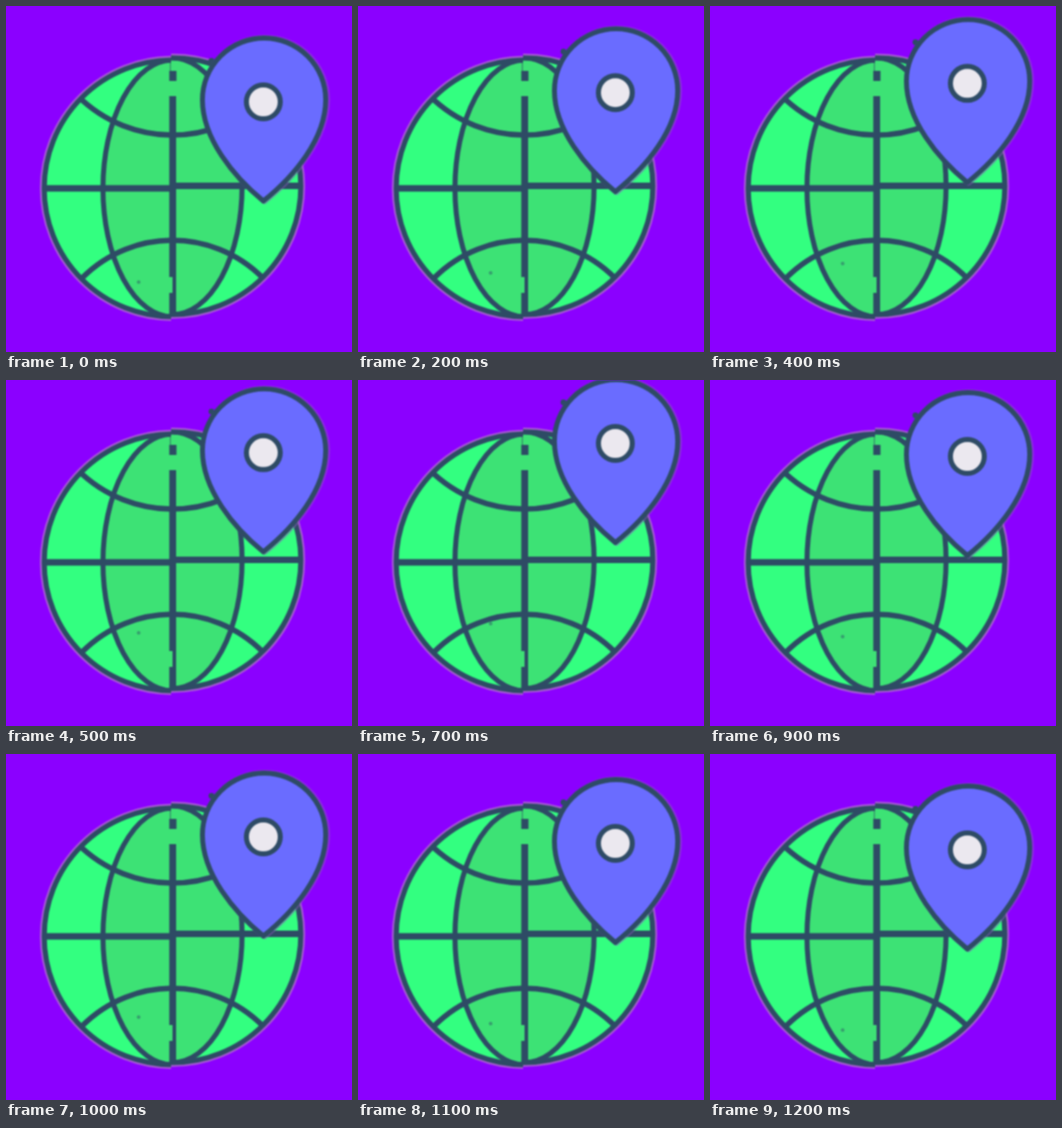
Write an HTML page with a canvas that moves like this. It is 480 px wide and 480 px high and loops after 1.3 s.

```html
<!DOCTYPE html>
<html lang="en">
<head>
<meta charset="utf-8">
<title>Globe with map pin</title>
<style>
html, body { margin: 0; width: 100%; height: 100%; overflow: hidden; background: #8b00ff; }
canvas { display: block; width: 100vw; height: 100vh; filter: blur(0.9px); }
</style>
</head>
<body>
<canvas id="stage" width="480" height="480"></canvas>
<script>
const ctx = document.getElementById('stage').getContext('2d');
const INK = '#2e4b65', BG = '#8b00ff', LIGHT = '#33ff80', MID = '#3de275';
const PIN = '#6a6cff', HOLE = '#ebe8ef';
const CX = 231, R = 178, LOOP = 1300, STEP = 100, RISE = 700, FALL = 500, TRAVEL = 45;

function shape(path, fill, stroke, width) {
  ctx.beginPath();
  path();
  if (fill) { ctx.fillStyle = fill; ctx.fill(); }
  if (stroke) { ctx.strokeStyle = stroke; ctx.lineWidth = width; ctx.stroke(); }
}

const disc = (x, y, r) => () => ctx.arc(x, y, r, 0, Math.PI * 2);

function bar(x, y, w, h, color = INK) {
  ctx.fillStyle = color;
  ctx.fillRect(x, y, w, h);
}

// The two halves of the globe sit at slightly different heights.
function half(x, width, cy, equator) {
  ctx.save();
  ctx.beginPath();
  ctx.rect(x, 0, width, 480);
  ctx.clip();
  shape(disc(CX, cy, R), null, 'rgba(176,122,196,0.75)', 12);
  shape(disc(CX, cy, R), LIGHT);
  ctx.save();
  ctx.beginPath();
  ctx.arc(CX, cy, R, 0, Math.PI * 2);
  ctx.clip();
  shape(() => ctx.ellipse(CX, cy, 96.5, R, 0, 0, Math.PI * 2), MID, INK, 7);
  shape(disc(CX, -7.5, 186.5), null, INK, 7.5);
  shape(disc(CX, 501.5, 176.5), null, INK, 7.5);
  bar(CX - R, equator - 4.5, R * 2, 9);
  ctx.restore();
  shape(disc(CX, cy, R), null, INK, 7);
  ctx.restore();
}

function globe() {
  half(0, 229, 253, 253);
  half(229, 251, 250, 249.5);
  bar(226.5, 90, 10, 14);
  bar(226.5, 125, 9.5, 251);
  bar(231, 375, 5, 55);
  bar(226.5, 398, 9.5, 32);
  bar(227, 76, 2, 14, 'rgba(46,75,101,0.45)');
}

function drop() {
  ctx.moveTo(357, 270.5);
  ctx.bezierCurveTo(316, 237, 272.5, 184, 272.5, 130);
  ctx.arc(358, 130, 85.5, Math.PI, 0);
  ctx.bezierCurveTo(443.5, 184, 400, 236, 357, 270.5);
  ctx.closePath();
}

function pin(dy) {
  ctx.save();
  ctx.translate(0, dy);
  shape(disc(184, 383, 2.5), 'rgba(46,75,101,0.45)');
  shape(disc(285, 76, 4), INK);
  ctx.save();
  ctx.translate(1.5, 0);
  shape(drop, null, 'rgba(140,90,190,0.5)', 9);
  ctx.restore();
  shape(drop, PIN, INK, 6.8);
  shape(disc(357, 133, 23.5), HOLE, INK, 7);
  ctx.restore();
}

function lift(t) {
  return t <= RISE ? t / RISE : Math.max(0, 1 - (t - RISE) / FALL);
}

function draw(now) {
  const t = Math.floor((now % LOOP) / STEP) * STEP;
  bar(0, 0, 480, 480, BG);
  globe();
  pin(-TRAVEL * lift(t));
}

ctx.lineJoin = 'round';
let start;
function tick(now) {
  if (start === undefined) start = now;
  draw(Math.max(0, now - start));
  requestAnimationFrame(tick);
}
draw(0);
requestAnimationFrame(tick);
</script>
</body>
</html>
```
